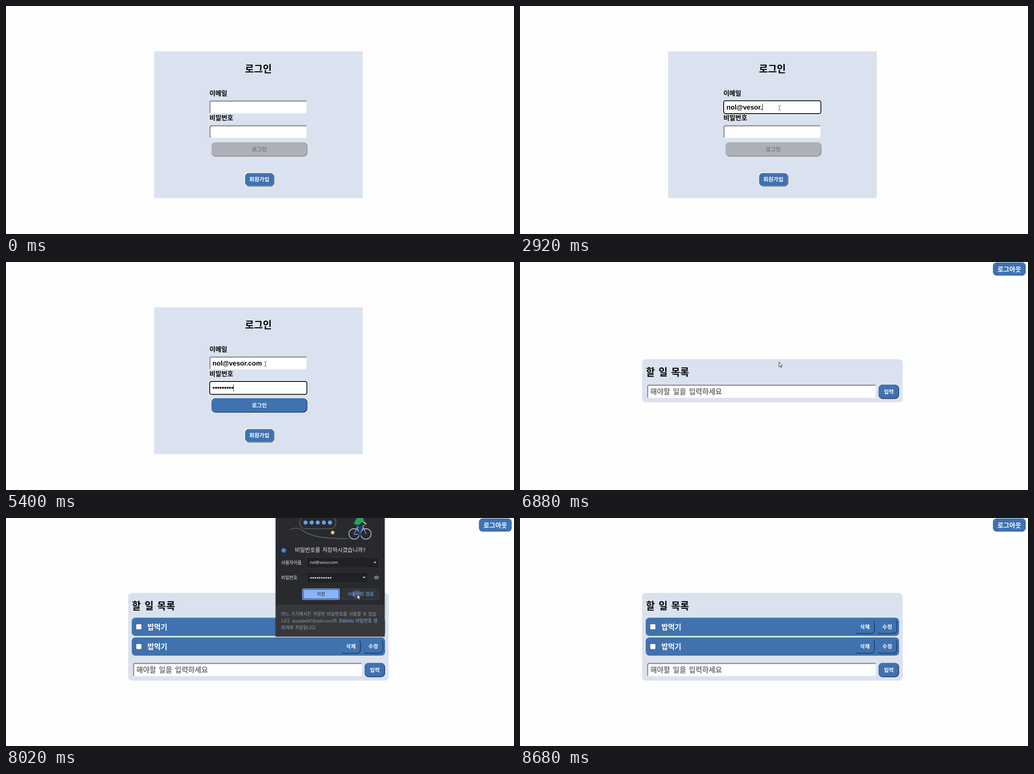
An HTML page that plays this animation: 1115 by 502 pixels, repeating every 9540 ms.

```html
<!DOCTYPE html>
<html lang="ko">
<head>
<meta charset="utf-8">
<title>할 일 목록</title>
<style>
  html, body { margin: 0; width: 100%; height: 100%; overflow: hidden; background: #fefefe; }
  svg { display: block; }
  text { font-family: 'Noto Sans CJK KR', 'Noto Sans CJK JP', 'Noto Sans CJK', sans-serif; word-spacing: .1em; white-space: pre; }
  .b { font-weight: 700; }
  .mid { text-anchor: middle; }
  .field { font: 700 14.6px 'Liberation Sans', Arial, sans-serif; }
  .latin { font-family: 'Noto Sans', sans-serif; }
</style>
</head>
<body>
<svg id="stage" width="1115" height="502" viewBox="0 0 1115 502"></svg>
<script>
const LOOP = 9540;
const BLUE = '#3f72af', PANEL = '#dbe2ef', NAVY = '#1c3557', LINK = '#8ab4f8';
const EMAIL = 'nol@vesor.com';

// Markup helpers; text is placed by its vertical centre.
const rect = (x, y, w, h, fill, rx = 0, extra = '') =>
  `<rect x="${x}" y="${y}" width="${w}" height="${h}" rx="${rx}" fill="${fill}" ${extra}/>`;
const path = (d, stroke, width = 1, extra = '') =>
  `<path d="${d}" fill="none" stroke="${stroke}" stroke-width="${width}" ${extra}/>`;
const dot = (x, y, r, fill) => `<circle cx="${x}" cy="${y}" r="${r}" fill="${fill}"/>`;
const text = (x, cy, size, str, fill = '#000', cls = 'b', extra = '') =>
  `<text x="${x}" y="${cy + size * .37}" font-size="${size}" fill="${fill}" class="${cls}" ${extra}>${str}</text>`;
const group = (id, body) => `<g id="${id}">${body}</g>`;

const insetInput = (x, y, w, h) =>
  rect(x, y, w, h, '#e9edf4', 4) + rect(x + 1, y + 1, w - 2, h - 2.5, '#fff', 3) +
  path(`M${x + 1.2} ${y + h - 1.5}V${y + 4.5}q0 -3.3 3.3 -3.3H${x + w - 1}`, '#8b8e98', 2.4);
const focusRing = (x, y, w, h) =>
  rect(x - 1.5, y - 1.5, w + 3, h + 3, '#fff', 5.5) +
  rect(x + .5, y + .5, w - 1, h - 1, '#fff', 4, 'stroke="#101218" stroke-width="2"');
const raised = (x, y, w, h, fill, edge) =>
  rect(x, y, w, h, edge, 9) + rect(x, y, w - 1.3, h - 1.5, fill, 8.5);

const loginPage = () =>
  rect(325, 100, 458, 323, PANEL) +
  text(554, 138, 21.3, '로그인', '#000', 'b mid') +
  text(446.5, 192, 14.2, '이메일') +
  group('emailIdle', insetInput(446.5, 208, 213.5, 29)) +
  group('emailFocus', focusRing(446.5, 208, 214.5, 29.5)) +
  text(446.5, 245.5, 14.2, '비밀번호') +
  group('passIdle', insetInput(446.5, 262.5, 213.5, 29)) +
  group('passFocus', focusRing(446.5, 262.5, 214.5, 29.5)) +
  text(453.3, 222.7, 14.6, '', '#000', 'field', 'id="email"') +
  text(453.3, 277, 14.6, '', '#000', 'field', 'id="pass"') +
  rect(0, 0, 1, 16, '#111', 0, 'id="caret"') +
  group('loginOff', raised(451, 300, 210.5, 31.5, '#adb0b7', '#7f828a') +
    text(556, 316, 11.8, '로그인', '#77797e', 'b mid')) +
  group('loginOn', raised(451, 300, 210.5, 31.5, BLUE, NAVY) +
    text(556, 316, 11.8, '로그인', '#fff', 'b mid')) +
  rect(525, 368, 64.3, 29.7, '#85898f', 9) + rect(523.3, 366.3, 64.5, 30, '#fff', 9) +
  rect(524.7, 367.7, 63.2, 28.5, BLUE, 8) +
  text(556, 382, 11.9, '회원가입', '#fff', 'b mid') +
  group('suggest',
    `<path d="M530.5 245.5L537 239.5L543.5 245.5Z" fill="#292a2d"/>` +
    rect(521, 245, 132, 81.5, '#292a2d', 2.5) +
    rect(521, 293.5, 132, 33, '#34353a', 2.5) +
    dot(535.5, 269, 4.5, '#61a8d8') +
    text(550, 262, 8.9, 'k@vesor.com', '#e8eaed', 'latin') +
    text(550, 280, 9.2, '••••••••', '#b4b7bc', 'latin', 'textLength="" style="font-size:7.2px;letter-spacing:1.2px"').replace('textLength=""', '') +
    dot(535.5, 310.5, 4.8, '#a9abaf') +
    text(550, 311, 10.2, '비밀번호 관리...', '#a5a9af', '') +
    dot(635.5, 310.5, 3.8, '#4285f4'));

const itemButton = (x, y, label) =>
  path(`M${x + 2} ${y + 29}q2 1.3 6 1.3H${x + 34}q8.5 0 8.5 -8.5V${y + 9}q0 -5 -2 -7`, NAVY, 1.5) +
  text(x + 21.5, y + 15.5, 11.6, label, '#fff', 'b mid');
const todoRow = y =>
  rect(276, y, 556, 40, BLUE, 8) +
  rect(285.5, y + 14, 12, 12, '#fff', 2, 'stroke="#767676"') +
  text(310.5, y + 20.3, 15.8, '밥먹기', '#fff') +
  itemButton(735.5, y + 4.5, '삭제') + itemButton(784.5, y + 4.5, '수정');

const todoPage = () =>
  rect(1038, 1, 72, 29, BLUE, 8) +
  text(1074, 15.7, 14.1, '로그아웃', '#fff', 'b mid') +
  rect(268, 214, 572, 95, PANEL, 8, 'id="card"') +
  group('heading', text(276.5, 242, 21.3, '할 일 목록')) +
  group('rows', todoRow(219.5) + todoRow(263)) +
  group('entry', insetInput(279, 270, 502.5, 30) +
    text(286, 284.7, 15.8, '해야할 일을 입력하세요', '#757575') +
    raised(787, 270, 45, 31.5, BLUE, NAVY) +
    text(809.5, 286, 11.7, '입력', '#fff', 'b mid'));

const cyclist = () =>
  [764, 790].map(x => `<circle cx="${x}" cy="35" r="11.5" fill="none" stroke="#dfe1e5" stroke-width="1.4"/>`).join('') +
  path('M764 35L771 21L784 22L776 36H764M776 36L770 18M790 35L783 17H788', '#8ab4f8', 1.3) +
  path('M768 13L779 22L775 36H780', '#1f3f7a', 5, 'stroke-linejoin="round"') +
  `<path d="M763 13L770 0H784L786 8L792 13L790 15L781 9L775 15Z" fill="#23a566"/>` +
  path('M786 9L791 14', '#e8a38c', 2.4);
const triangle = (x, y) => `<path d="M${x - 3} ${y - 1.5}h6l-3 3.2z" fill="#e8eaed"/>`;

const saveDialog = () =>
  rect(590.5, -4, 242, 266.5, '#000', 3, 'opacity=".25"') +
  rect(592, -4, 239, 265, '#292a2d', 2) +
  rect(592, 191, 239, 70, '#37383b', 2) +
  path('M624 26Q636 18 650 27C672 42 690 44 750 46', '#5f6368', 1.6) +
  rect(645, -4, 79, 27.5, '#292a2d', 12, 'stroke="#5f6368" stroke-width="1.6"') +
  [0, 1, 2, 3, 4].map(i => dot(657.5 + i * 13.4, 10, 4.5, '#669df6')).join('') +
  rect(713.5, 28.5, 7, 7, '#fcc55c', 1, 'transform="rotate(30 717 32)"') +
  cyclist() +
  dot(609.5, 71.5, 5, '#4285f4') +
  text(634, 71, 12.1, '비밀번호를 저장하시겠습니까?', '#e8eaed', '') +
  text(604, 98, 9.7, '사용자이름', '#e8eaed', '') +
  rect(660.5, 86.5, 158, 23.5, '#202124', 2, 'stroke="#343639"') +
  text(667, 98, 8.7, EMAIL, '#e8eaed', 'latin') + triangle(810, 98) +
  text(604, 131, 9.7, '비밀번호', '#e8eaed', '') +
  rect(660.5, 119.5, 134, 23.5, '#202124', 2, 'stroke="#343639"') +
  Array.from({ length: 10 }, (_, i) => dot(669.3 + i * 4.8, 131.7, 1.7, '#e8eaed')).join('') +
  triangle(786, 131) +
  `<path d="M807.5 131q5.5 -8 11 0q-5.5 8 -11 0Z" fill="#9aa0a6"/>` +
  dot(813, 131, 2.6, '#292a2d') + dot(813, 131, 1.5, '#9aa0a6') +
  rect(651, 156, 81, 23.5, '#24406e', 2.5, `stroke="${LINK}" stroke-width="1.6"`) +
  rect(653, 158, 77, 19.5, LINK, 1.5) +
  text(691.5, 167.5, 9.7, '저장', '#202124', 'mid') +
  rect(738.5, 156.5, 80.5, 23, '#292a2d', 2, 'id="decline" stroke="#3f4248"') +
  `<circle id="ripple" cx="770.5" cy="168" r="10" fill="#434c5c"/>` +
  text(778.5, 167.5, 9.7, '사용하지 않음', LINK, 'mid') +
  text(604, 211, 9.7, '어느 기기에서든 저장된 비밀번호를 사용할 수 있습', '#9aa0a6', '') +
  text(604, 226, 9.7, '니다. <tspan class="latin" font-size="8.8">dunabel47@zelit.com</tspan>의', '#9aa0a6', '') +
  text(731, 226, 9.7, 'Dobelu 비밀번호 관', LINK, '') +
  text(604, 241, 9.7, `<tspan fill="${LINK}">리자</tspan>에 저장됩니다.`, '#9aa0a6', '');

document.getElementById('stage').innerHTML =
  group('login', loginPage()) + group('todo', todoPage()) + group('dialog', saveDialog()) +
  group('arrow', `<path d="M.5 .5V11L3 8.7L4.7 12.6L6.4 11.9L4.7 8H8Z" fill="#fff" stroke="#111" stroke-width=".9"/>`) +
  group('beam', path('M-3 -4.7H-.6L0 -4.2L.6 -4.7H3M0 -4.2V4.2M-3 4.7H-.6L0 4.2L.6 4.7H3', '#444', .9));

const el = {};
document.querySelectorAll('[id]').forEach(e => el[e.id] = e);

// Step tables: [start in ms, value...]; each row holds until the next.
const emailLength = [[0, 0], [1780, 1], [1990, 2], [2320, 3], [2460, 4], [2590, 5], [2660, 6],
  [2720, 7], [2790, 8], [2860, 9], [2920, 10], [2990, 12], [3200, 13]];
const passLength = [[0, 0], [3790, 1], [3860, 2], [4130, 3], [4200, 4], [4400, 5], [4530, 6],
  [4800, 7], [4870, 8], [5400, 9], [5600, 10]];
const suggestFade = [[0, 0], [990, .35], [1050, .75], [1120, 1], [1850, .78], [1920, .5], [1990, .22], [2060, 0]];
const dialogFade = [[0, 0], [7080, .35], [7150, .75], [7210, 1], [8080, .5], [8150, 0]];
const caretOn = [[0, 0], [930, 1], [1450, 0], [1780, 1], [6130, 0]];
const pointer = [[0, -50, -50], [70, 926, 440], [130, 905, 405], [200, 850, 345], [270, 780, 290],
  [330, 705, 255], [400, 638, 233], [470, 590, 227], [530, 569.5, 224.3], [6330, 568, 220],
  [7480, 575, 216], [7550, 605, 203], [7610, 650, 190], [7680, 700, 180], [7750, 742, 173],
  [7810, 762, 170], [7880, 770.5, 168], [8150, 778, 178], [8210, 815, 235], [8280, 885, 335],
  [8350, 957, 428], [8410, 1010, 486], [8480, 1024, 492], [8550, 1035, 496], [8610, 1042, 498],
  [8680, -50, -50]];

const at = (table, t) => table.reduce((row, next) => next[0] <= t ? next : row);
const show = (node, on) => node.setAttribute('visibility', on ? 'inherit' : 'hidden');
const move = (node, x, y) => node.setAttribute('transform', `translate(${x} ${y})`);
const setText = (node, str) => { if (node.textContent !== str) node.textContent = str; };

function render(t) {
  const onTodo = t >= 6750, loaded = t >= 7020;
  const inEmail = t >= 930 && t < 3330, inPass = t >= 3330;
  show(el.login, !onTodo);
  show(el.todo, onTodo);

  show(el.emailIdle, !inEmail);
  show(el.emailFocus, inEmail);
  show(el.passIdle, !inPass);
  show(el.passFocus, inPass);
  const typed = at(passLength, t)[1];
  setText(el.email, EMAIL.slice(0, at(emailLength, t)[1]));
  setText(el.pass, '•'.repeat(typed));
  show(el.loginOff, typed < 8);
  show(el.loginOn, typed >= 8);
  show(el.caret, at(caretOn, t)[1]);
  const active = inPass ? el.pass : el.email;
  const width = active.textContent ? active.getComputedTextLength() : 0;
  move(el.caret, Math.round(453.2 + width), inPass ? 269 : 215);
  el.suggest.setAttribute('opacity', at(suggestFade, t)[1]);

  const shift = loaded ? 49 : 0;
  el.card.setAttribute('y', 214 - shift);
  el.card.setAttribute('height', 95 + 2 * shift);
  move(el.heading, 0, -shift);
  move(el.entry, 0, shift);
  show(el.rows, loaded);
  el.dialog.setAttribute('opacity', at(dialogFade, t)[1]);
  el.decline.setAttribute('fill', t >= 7750 ? '#303338' : '#292a2d');
  show(el.ripple, t >= 7950);

  const [, x, y] = at(pointer, t);
  const beam = t >= 400 && t < 6330;
  show(el.beam, beam);
  show(el.arrow, !beam);
  move(beam ? el.beam : el.arrow, x, y);
}

function tick() {
  render(performance.now() % LOOP);
  requestAnimationFrame(tick);
}
tick();
</script>
</body>
</html>
```
